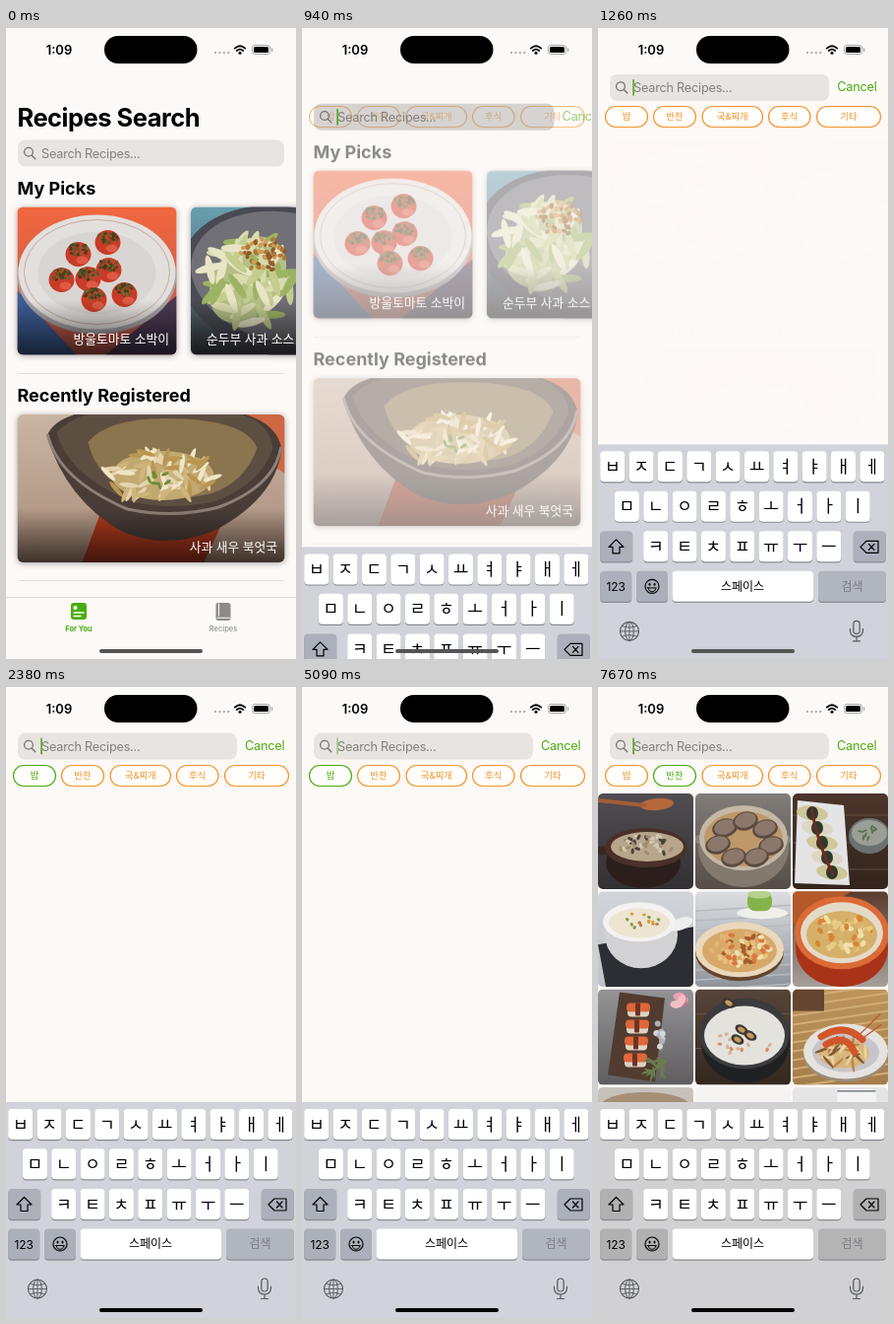
These frames come from a looping animation (295 by 640 pixels, 8 s). An HTML page:

```html
<!DOCTYPE html>
<html lang="ko">
<head>
<meta charset="utf-8">
<title>Recipes Search</title>
<style>
html, body { margin: 0; width: 100%; height: 100%; overflow: hidden; background: #fdf9f7; }
svg { display: block; width: 100%; height: 100%; --board: #d0d3d9; --dim: #abb0ba; --off: #b1b5bc; }
svg.warm { --board: #d1d1d3; --dim: #b2b1b2; --off: #b5b4b5; }
text { font-family: Inter, "Noto Sans CJK KR", "Noto Sans CJK", sans-serif; }
.m { text-anchor: middle; }
.e { text-anchor: end; }
.b { font-weight: 700; }
.w { font-weight: 500; }
.card { filter: drop-shadow(0 1px 3px rgba(0, 0, 0, .35)); }
.line { fill: none; stroke-linecap: round; stroke-linejoin: round; }
</style>
</head>
<body>
<svg id="stage" viewBox="0 0 295 640"></svg>
<script>
const LOOP = 8000, GREEN = '#4aad12', ORANGE = '#f2942a';
const stage = document.getElementById('stage');
const $ = id => document.getElementById(id);

// Drawing helpers
const rect = (x, y, w, h, fill, r = 0, more = '') =>
  `<rect x="${x}" y="${y}" width="${w}" height="${h}" rx="${r}" fill="${fill}" ${more}/>`;
const oval = (x, y, rx, ry, fill, turn = 0, more = '') =>
  `<ellipse cx="${x}" cy="${y}" rx="${rx}" ry="${ry}" fill="${fill}" transform="rotate(${turn} ${x} ${y})" ${more}/>`;
const path = (d, stroke, width = 1) =>
  `<path class="line" d="${d}" stroke="${stroke}" stroke-width="${width}"/>`;
const area = (d, fill) => `<path d="${d}" fill="${fill}"/>`;
const text = (x, y, size, fill, s, cls = '', more = '') =>
  `<text x="${x}" y="${y}" font-size="${size}" fill="${fill}" class="${cls}" ${more}>${s}</text>`;
const group = (id, body) => `<g id="${id}">${body}</g>`;
const spread = (n, f) => Array.from({ length: n }, (_, i) => f(i)).join('');
const tight = 'letter-spacing="-.02em"';

let seed = 7;
const rnd = () => (seed = seed * 16807 % 2147483647) / 2147483647;

// Small bits strewn evenly over an ellipse
const strew = (n, x, y, rx, ry, w, h, colors) => spread(n, i => {
  const a = rnd() * 6.283, d = Math.sqrt(rnd());
  return oval(x + Math.cos(a) * d * rx, y + Math.sin(a) * d * ry, w, h, colors[i % colors.length], rnd() * 180);
});

// Rounded picture on a vertical gradient
let count = 0;
function picture(x, y, w, h, r, top, bottom, body, cls = '') {
  const n = count++;
  return `<g class="${cls}" transform="translate(${x} ${y})">
    <clipPath id="clip${n}">${rect(0, 0, w, h, '#000', r)}</clipPath>
    <linearGradient id="bg${n}" x2="0" y2="1"><stop stop-color="${top}"/><stop offset="1" stop-color="${bottom}"/></linearGradient>
    <g clip-path="url(#clip${n})">${rect(0, 0, w, h, `url(#bg${n})`)}${body}</g></g>`;
}
const card = (x, y, w, top, bottom, body) =>
  picture(x, y, w, 150, 6, top, bottom, body + rect(0, 95, w, 55, 'url(#shade)'), 'card');

const tomato = ([x, y]) => oval(x, y, 13, 12.5, '#c93b27') + oval(x + 4, y + 6, 6, 4, '#dd5a44')
  + strew(30, x, y - 5, 10, 6, 2, 1.4, ['#4b3a1c', '#6b5426', '#3c4a1e', '#8a5a2c']);

const tomatoes = area('M0 85L60 150H0Z', '#3d5d94') + area('M162 90L90 150H162Z', '#4a3a52')
  + oval(81, 70, 81, 59, '#a9a3a8') + oval(81, 66, 80, 58, '#e3dfdc')
  + oval(81, 66, 74, 53, 'none', 0, 'stroke="#bd9d92" stroke-width=".8"')
  + oval(81, 67, 60, 42, '#d9d5d3')
  + [[92, 36], [62, 48], [93, 64], [45, 74], [72, 73], [109, 89], [78, 94]].map(tomato).join('');

const salad = oval(96, 76, 108, 76, '#4a4a54', 12) + oval(98, 72, 99, 66, '#717076', 12)
  + oval(58, 74, 34, 48, '#b4bf86', 35)
  + strew(50, 58, 74, 44, 44, 15, 4, ['#d9dcae', '#9db364', '#e8e5c6', '#c3cd8e'])
  + strew(55, 74, 48, 23, 17, 2.8, 2, ['#b07838', '#cf9b55', '#8f5a28']);

const soup = area('M66 150L86 96H215L190 150Z', '#b23a1e') + area('M185 0H272V60Z', '#cf6744')
  + area('M30 22Q40 -4 100 -6H200Q264 0 269 36Q262 86 200 118Q150 138 105 118Q50 86 30 22Z', '#4a3d37')
  + path('M31 21Q42 66 112 96Q160 106 205 94Q262 72 268 34', '#8d8078', 3)
  + area('M40 18Q60 -4 110 -6H200Q256 0 260 34Q248 70 202 88Q155 98 115 88Q50 60 40 18Z', '#5d4e42')
  + area('M72 28Q92 4 150 4Q232 4 244 34Q232 68 198 80Q155 90 118 80Q80 64 72 28Z', '#8b754e')
  + oval(148, 62, 52, 25, '#c2a871')
  + strew(60, 146, 62, 54, 26, 10, 2.4, ['#e3d4ad', '#cdb57c', '#f0e5c8', '#b99750'])
  + strew(7, 146, 66, 20, 8, 4, 1.5, ['#6a8b35']);

const tile = (i, top, bottom, body) =>
  picture(i % 3 * 99, 108 + Math.floor(i / 3) * 99.3, 97, 97, 5, top, bottom, body);

const roll = ([x, y]) => oval(x, y, 13, 9.5, '#5b4a40', -15) + oval(x, y - 1, 11, 7.5, '#8b786b', -15);
const sushi = (x, y) => rect(x - 11, y, 22, 9, '#ded3c4', 4) + rect(x - 12, y - 5, 24, 9, '#e0673a', 4)
  + rect(x - 3, y - 5, 5, 13, '#6b3327', 1);
const shell = ([x, y]) => oval(x, y, 7, 4.5, '#3d3737', 30) + oval(x, y, 4, 2.5, '#c4985b', 30);

const tiles = [
  ['#514d52', '#333034', oval(60, 11, 17, 6, '#b5683c', -5) + path('M0 7L48 12', '#a45c36', 4)
    + oval(46, 70, 38, 26, '#2b1e1b') + path('M0 58H14', '#382823', 9) + oval(49, 55, 42, 20, '#493129')
    + oval(50, 54, 37, 15, '#b7a58c') + strew(34, 50, 53, 29, 10, 3, 1.6, ['#d3c7b1', '#a08c6e', '#4c4136'])],
  ['#817d79', '#564d47', oval(49, 55, 46, 40, '#83796e') + rect(0, 42, 97, 9, '#8c8379', 4)
    + oval(49, 45, 45, 33, '#c3b8a6') + oval(49, 46, 40, 28, '#bd9869')
    + [[30, 35], [51, 28], [71, 36], [23, 52], [77, 53], [39, 65], [62, 65]].map(roll).join('')],
  ['#4b352b', '#33241d', path('M0 22H97M0 50H97M0 77H97', '#644a3c', 1)
    + area('M5 7L52 12 58 93 2 91Z', '#e4e4e6')
    + spread(5, i => oval(20 + i * 5, 20 + i * 15, 16, 7.5, ['#cfc79a', '#ddd6c0'][i % 2], 8) + oval(20 + i * 5, 20 + i * 15, 6, 7, '#2d392c'))
    + path('M19 15Q26 53 41 82', '#6d2a20', 3) + oval(78, 43, 21, 18, '#6b716f') + oval(78, 40, 18, 13, '#9a9e95')
    + strew(9, 78, 40, 11, 7, 3, 1, ['#55704a'])],
  ['#d1d4d8', '#c0c4ca', area('M0 54L97 36V97H8Z', '#2d2e34') + oval(44, 44, 37, 34, '#d2d2d5')
    + oval(84, 33, 13, 6, '#eeeeef', -20) + oval(42, 31, 37, 20, '#f3f2f0') + oval(42, 32, 31, 15, '#ede4d2')
    + strew(14, 42, 31, 22, 9, 1.9, 1.5, ['#d5a23c', '#7f9a4b', '#c67542'])],
  ['#dcdee1', '#8f949b', spread(9, i => path(`M0 ${20 + i * 10}L97 ${14 + i * 10}`, '#b6bac0', 1.5))
    + oval(68, 22, 26, 6, '#eff0ea') + rect(53, 0, 25, 20, '#85b34b', 8) + oval(65, 3, 12, 4, '#b7d18c')
    + oval(45, 62, 45, 29, '#65442f') + oval(45, 59, 45, 28, '#ead8bc') + oval(45, 60, 38, 22, '#d6a969')
    + strew(60, 45, 58, 31, 17, 3.4, 2.2, ['#e8c17e', '#d9783e', '#f0dfae', '#a65d2c', '#e2b473'])],
  ['#593c2d', '#a7a19b', area('M0 0H60L0 34Z', '#b45a2a') + oval(50, 58, 47, 39, '#a93318')
    + oval(50, 42, 48, 37, '#db6b37') + oval(50, 42, 42, 31, '#e5dac8') + oval(50, 44, 36, 24, '#d5b06a')
    + strew(60, 50, 42, 31, 19, 3.4, 2.4, ['#e8cc84', '#d98532', '#f0e0ab', '#d9b36c'])],
  ['#949396', '#5f5d5f', area('M22 3L68 9 58 94 10 87Z', '#513c2f')
    + spread(4, i => sushi(41 - i, 19 + i * 17)) + strew(9, 62, 45, 5, 16, 3, 3, ['#d6d6d9', '#aeb1b7'])
    + strew(8, 84, 13, 8, 6, 6, 4, ['#e6a1b1', '#f1bec7', '#cc7188']) + strew(16, 59, 80, 11, 11, 6, 1.2, ['#6b7c4f'])],
  ['#564439', '#33281f', path('M0 25H97M0 60H97', '#69564a', 1) + oval(51, 53, 45, 42, '#202123')
    + oval(50, 45, 46, 36, '#3b3b3d') + oval(50, 47, 41, 30, '#e4e2dd')
    + strew(18, 50, 53, 29, 15, 2.4, 1.7, ['#d99058', '#d6b39a'])
    + [[47, 41], [56, 47], [43, 51], [34, 14]].map(shell).join('')],
  ['#bd945b', '#a37d4b', spread(12, i => path(`M0 ${i * 9}L97 ${i * 9 - 14}`, '#d0ac76', 2))
    + rect(0, 0, 32, 22, '#644630') + oval(54, 66, 43, 28, '#9c8c79') + oval(54, 63, 43, 28, '#e5e2df')
    + oval(54, 64, 34, 20, '#c7c5ca') + oval(52, 65, 26, 15, '#d7b77d')
    + strew(22, 52, 65, 23, 13, 8, 1.4, ['#ebd3a0', '#b98747', '#805b37'])
    + path('M29 48Q53 33 71 51M34 56Q55 44 63 64', '#d2562a', 7) + path('M69 45L89 25M71 50L90 36', '#c94f28', 1.3)],
  ['#c9c3bd', '#b3a698', oval(48, 20, 46, 15, '#a68f77')],
  ['#f5f4f3', '#efedec', ''],
  ['#e6e6e7', '#dadbdc', rect(45, 2, 40, 20, '#f3f3f3', 5) + path('M46 4H84', '#5d6670', 1.4)],
].map((t, i) => tile(i, ...t)).join('');

// Category chips
const chips = [['밥', 7.5, 43], ['반찬', 56.5, 43], ['국&amp;찌개', 106, 61.5], ['후식', 173.5, 42.5], ['기타', 222.5, 65]]
  .map(([name, x, w], i) => `<g id="chip${i}">`
    + rect(x, 79.5, w, 21, '#fffefc', 10.5, 'stroke-width="1.2"')
    + text(x + w / 2, 93.4, 9.4, 'inherit', name, 'm', 'stroke="none"') + '</g>').join('');

// Keyboard
const key = (x, y, w, fill = '#fff') => rect(x, y + 1.2, w, 31, '#898c92', 4) + rect(x, y, w, 31, fill, 4);
const keyRow = (letters, x, y) => [...letters].map((c, i) =>
  key(x + i * 29.35, y, 25) + text(x + i * 29.35 + 12.5, y + 21.5, 17, '#000', c, 'm')).join('');
const DIM = 'var(--dim)', INK = '#56595e';
const ring = (x, y, rx, ry, color, width) => oval(x, y, rx, ry, 'none', 0, `stroke="${color}" stroke-width="${width}"`);
const keyboard = rect(0, 421, 295, 240, 'var(--board)')
  + keyRow('ㅂㅈㄷㄱㅅㅛㅕㅑㅐㅔ', 2.2, 428) + keyRow('ㅁㄴㅇㄹㅎㅗㅓㅏㅣ', 16.9, 468.3) + keyRow('ㅋㅌㅊㅍㅠㅜㅡ', 46.2, 509)
  + key(2.2, 509, 33, DIM) + path('M18.5 517.5L26 525H22V531.5H15V525H11Z', '#000', 1.2)
  + key(259.8, 509, 33, DIM) + path('M267 525L273 519H285V531H273ZM275.5 522L281 528M281 522L275.5 528', '#000', 1.2)
  + key(2.2, 549.5, 32, DIM) + text(18.2, 569.8, 12, '#000', '123', 'm')
  + key(39, 549.5, 32, DIM) + ring(55, 565, 7, 7, '#000', 1.2)
  + oval(52.5, 563, 1, 1.5, '#000') + oval(57.5, 563, 1, 1.5, '#000')
  + path('M50.7 566.5H59.3Q58 570.5 55 570.5Q52 570.5 50.7 566.5Z', '#000', 1)
  + key(75.5, 549.5, 143.5) + text(147, 569.2, 12, '#000', '스페이스', 'm')
  + key(224, 549.5, 69, 'var(--off)') + text(258.5, 569.2, 12, '#7b7e84', '검색', 'm')
  + ring(32, 610.5, 9.5, 9.5, INK, 1.1) + ring(32, 610.5, 4.3, 9.5, INK, 1)
  + path('M32 601V620M22.5 610.5H41.5M24.5 605Q32 608.5 39.5 605M24.5 616Q32 612.5 39.5 616', INK, .9)
  + rect(259.8, 600, 6.4, 13, 'none', 3.2, `stroke="${INK}" stroke-width="1.2"`)
  + path('M256.5 608V610Q257 616 263 616Q269 616 269.5 610V608M263 616V620.5M259.5 620.5H266.5', INK, 1.2);

const rule = y => rect(12, y, 271, .8, '#dfdbd8');
const caption = (x, y, s, cls = '') => text(x, y, 12.8, '#fff', s, 'w ' + cls);
const content = text(11.5, 169, 18, '#000', 'My Picks', 'b')
  + card(11.5, 181.5, 162, '#f2673f', '#b8574c', tomatoes) + card(188, 181.5, 162, '#68a0b0', '#44454e', salad)
  + caption(166, 320, '방울토마토 소박이', 'e') + caption(204, 320, '순두부 사과 소스')
  + rule(350) + text(11.5, 379, 18, '#000', 'Recently Registered', 'b')
  + card(11.5, 392, 272, '#c9b5a4', '#a98c79', soup)
  + caption(276, 530.5, '사과 새우 북엇국', 'e') + rule(560);

const tabs = rect(0, 577, 295, 63, '#fcf9f7') + rect(0, 577, 295, .7, '#d2cfcc')
  + rect(66, 583, 16, 17, GREEN, 3) + oval(70.5, 588, 2, 2, '#fff') + path('M69 593H79M69 596.5H76', '#fff', 1.3)
  + text(74, 611.5, 7.5, GREEN, 'For You', 'm b')
  + rect(213.5, 583, 15, 18, '#8d8b89', 2.5) + path('M216.5 584V596M215 598.3H227.5', '#fcf9f6', 1.1)
  + text(221, 611.5, 7.5, '#96938f', 'Recipes', 'm w');

const search = rect(12, 113.5, 271, 27, '#6e6b6b', 7.5, 'id="field"')
  + ring(23, 125.8, 4.4, 4.4, '#77736f', 1.3) + path('M26.3 129.2L29.8 132.7', '#77736f', 1.4)
  + text(36, 131.6, 12.75, '#85807c', 'Search Recipes...', '', tight)
  + rect(35.3, 118.5, 1.6, 17, GREEN, .8, 'id="caret"')
  + text(0, 131.1, 12.75, GREEN, 'Cancel', '', `id="cancel" ${tight}`);

const status = text(54, 26.6, 13, '#000', '1:09', 'm', 'font-weight="600"') + rect(100, 8, 94.5, 28, '#000', 14)
  + spread(4, i => oval(213 + i * 4.4, 25, 1.3, 1.3, '#bbb8b5'))
  + path('M232.8 20.6Q238 16 243.2 20.6M234.8 23Q238 20.3 241.2 23', '#000', 1.8) + oval(238, 25.3, 1.5, 1.5, '#000')
  + rect(250.5, 17.5, 18, 9, 'none', 2.8, 'stroke="#999" stroke-width=".9"') + rect(252, 19, 15, 6, '#000', 1.6)
  + rect(270, 20.3, 1.2, 3.5, '#999', .6);

stage.innerHTML = `<linearGradient id="shade" x2="0" y2="1"><stop stop-opacity="0"/><stop offset="1" stop-opacity=".65"/></linearGradient>`
  + rect(0, 0, 295, 640, '#fdf9f7')
  + group('content', content) + group('title', text(11.5, 100, 25.5, '#000', 'Recipes Search', 'b', tight))
  + group('tabs', tabs) + group('tiles', tiles) + group('chips', chips) + group('search', search)
  + group('keyboard', keyboard) + status + rect(95, 630, 105, 4, '#555', 2, 'id="home"');

// Motion advances in held steps
const STEPS = [0, 610, 720, 830, 940, 1050, 1150, 1260, 1370, 1480, 1720, 1840, 2380, 2500, 3060, 3170, 3420, 3540,
  4080, 4190, 4430, 4550, 5090, 5210, 5450, 5560, 6110, 6230, 6470, 6590, 6700, 7200, 7310, 7550, 7670];
const BLINKS = [1370, 3060, 4080, 5090, 6110, 7200];
const last = (list, t) => list.filter(s => s <= t).pop();

function spring(ms) {
  const s = Math.max(0, ms) * .013;
  return Math.min(1, (1 - (1 + s) * Math.exp(-s)) * 1.012);
}
function caretAlpha(t) {
  if (t < 830) return 0;
  const d = t - (last(BLINKS, t) ?? -LOOP);
  return d < 100 ? .5 : d < 345 ? 0 : d < 445 ? .5 : 1;
}
const fade = (id, a) => $(id).setAttribute('opacity', Math.max(0, Math.min(1, a)));
const shift = (id, y) => $(id).setAttribute('transform', `translate(0 ${y})`);
function paint(id, color) {
  const [pill, name] = $(id).children;
  pill.setAttribute('stroke', color);
  name.setAttribute('fill', color);
}

function draw(now) {
  const t = last(STEPS, now % LOOP);
  const p = t >= 1370 ? 1 : spring(t - 800);
  const found = t >= 5450;
  for (const id of ['content', 'title', 'search']) shift(id, -67 * p);
  shift('keyboard', 234 * (1 - p));
  fade('content', 1 - p);
  fade('title', 1 - 2.2 * p);
  fade('chips', p);
  fade('cancel', p);
  fade('caret', caretAlpha(t));
  fade('tiles', found ? 1 : 0);
  fade('tabs', p < 1 ? 1 : 0);
  stage.classList.toggle('warm', found);
  $('field').setAttribute('width', 271 - 48 * p);
  fade('field', t >= 610 && t < 1150 ? .28 : .15);
  $('cancel').setAttribute('x', 291 - 48 * p);
  const picked = t < 2380 ? -1 : t < 6700 ? 0 : 1;
  for (let i = 0; i < 5; i++) paint('chip' + i, i === picked ? GREEN : ORANGE);
  $('home').setAttribute('fill', t < 1370 ? '#555' : '#000');
}

const start = performance.now();
function tick() {
  draw(performance.now() - start);
  requestAnimationFrame(tick);
}
tick();
</script>
</body>
</html>
```
